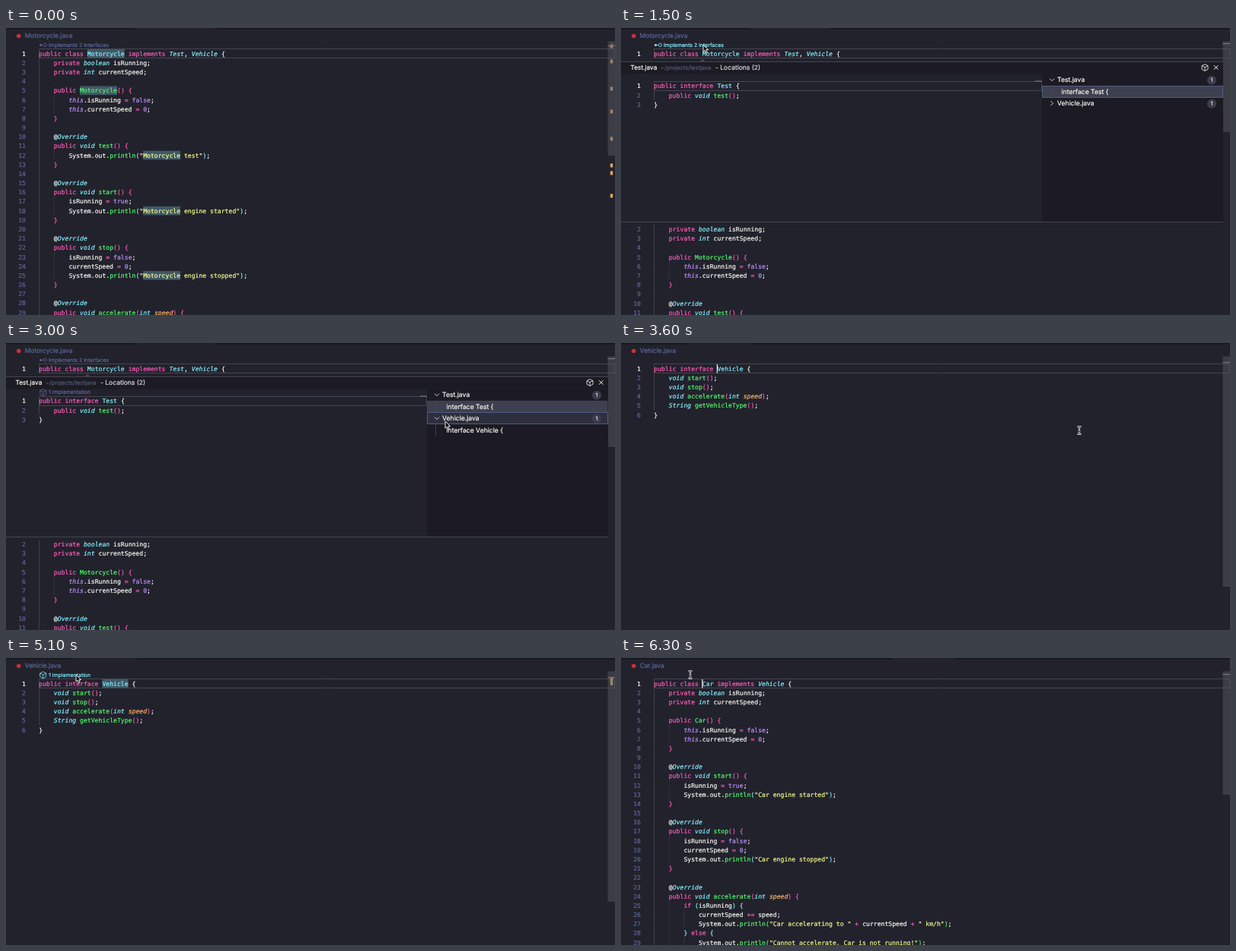
Write an HTML page with a canvas that moves like this. It is 800 by 378 pixels and loops after 6.4 s.

```html
<!DOCTYPE html>
<html lang="en">
<head>
<meta charset="utf-8">
<title>Code navigation</title>
<style>
html, body { margin: 0; height: 100%; overflow: hidden; background: #22222c; }
canvas { display: block; width: 800px; height: 378px; }
</style>
</head>
<body>
<canvas id="stage" width="800" height="378"></canvas>
<script>
const ctx = document.getElementById('stage').getContext('2d');
const LOOP = 6400, LINE = 12.18, CHAR = 4.89, LEFT = 43.3;
const MONO = '"DejaVu Sans Mono", monospace', SANS = 'Inter, sans-serif';
const C = {
  bg: '#22222c', panel: '#1c1b24', border: '#45444f', guide: '#363641', white: '#f8f8f2',
  pink: '#ff5cbc', cyan: '#83efff', green: '#50fa6b', purple: '#bd8ffb',
  yellow: '#f3fb8c', orange: '#ffb469', dim: '#5a6799', mark: '#405966'
};
const BRACKETS = [C.white, C.pink, C.cyan, C.green];

// Source files

const fields = `    private boolean isRunning;
    private int currentSpeed;
`;
const constructorOf = name => `    public ${name}() {
        this.isRunning = false;
        this.currentSpeed = 0;
    }
`;
const method = (signature, ...body) =>
  `    @Override\n    public void ${signature} {\n${body.map(s => '        ' + s).join('\n')}\n    }\n`;
const print = s => `System.out.println("${s}");`;
const startStop = name => [
  method('start()', 'isRunning = true;', print(name + ' engine started')),
  method('stop()', 'isRunning = false;', 'currentSpeed = 0;', print(name + ' engine stopped'))
];
const accelerate = name => method('accelerate(int speed)',
  'if (isRunning) {',
  '    currentSpeed += speed;',
  `    System.out.println("${name} accelerating to " + currentSpeed + " km/h");`,
  '} else {',
  '    ' + print(`Cannot accelerate. ${name} is not running!`),
  '}');

const files = {
  Motorcycle: parse(['public class Motorcycle implements Test, Vehicle {\n' + fields,
    constructorOf('Motorcycle'), method('test()', print('Motorcycle test')),
    ...startStop('Motorcycle'), accelerate('Motorcycle')].join('\n')),
  Car: parse(['public class Car implements Vehicle {\n' + fields,
    constructorOf('Car'), ...startStop('Car'), accelerate('Car')].join('\n')),
  Vehicle: parse(`public interface Vehicle {
    void start();
    void stop();
    void accelerate(int speed);
    String getVehicleType();
}`),
  Test: parse('public interface Test {\n    public void test();\n}')
};

function style(word, before, after) {
  if (word[0] === '"') return [C.yellow];
  if (/^(public|private|class|interface|implements|if|else|[-+=]+)$/.test(word)) return [C.pink];
  if (/^(void|int|boolean|String|Override)$/.test(word)) return [C.cyan, true];
  if (word === 'this') return [C.purple, true];
  if (/^(true|false|\d+)$/.test(word)) return [C.purple];
  if (/(class|interface) $/.test(before)) return [C.cyan];
  if (/implements [\w, ]*$/.test(before) && /\w/.test(word)) return [C.cyan, true];
  if (/\(int $/.test(before)) return [C.orange, true];
  if (/^\w/.test(word) && after[0] === '(') return [C.green];
  return [C.white];
}

function parse(text) {
  let depth = 0;
  return text.split('\n').map(line => ({
    line,
    indent: line ? line.search(/\S/) : 4,
    tokens: [...line.matchAll(/"[^"]*"|\w+|[-+=]+|\S/g)].map(({ 0: word, index }) => {
      let [color, italic] = style(word, line.slice(0, index), line.slice(index + word.length));
      if (/[({]/.test(word[0])) color = BRACKETS[depth++ % 4];
      if (/[)}]/.test(word[0])) color = BRACKETS[--depth % 4];
      return { word, col: index, color, italic };
    })
  }));
}

// Drawing helpers

function rect(x, y, w, h, color) {
  ctx.fillStyle = color;
  ctx.fillRect(x, y, w, h);
}
function frame(x, y, w, h, color) {
  ctx.strokeStyle = color;
  ctx.lineWidth = 1;
  ctx.strokeRect(x, y, w, h);
}
function text(s, x, y, size, color, align = 'left', font = SANS, italic) {
  ctx.font = `${italic ? 'italic ' : ''}${size}px ${font}`;
  ctx.textAlign = align;
  ctx.fillStyle = ctx.strokeStyle = color;
  ctx.fillText(s, x, y);
  // A hairline outline gives the slightly heavier strokes of the editor.
  ctx.lineWidth = 0.2;
  ctx.strokeText(s, x, y);
}
function path(d, x, y, stroke, width = 0.8, fill) {
  const shape = new Path2D(d);
  ctx.save();
  ctx.translate(x, y);
  if (fill) { ctx.fillStyle = fill; ctx.fill(shape); }
  ctx.strokeStyle = stroke;
  ctx.lineWidth = width;
  ctx.stroke(shape);
  ctx.restore();
}
function dot(x, y, r, color) {
  ctx.fillStyle = color;
  ctx.beginPath();
  ctx.arc(x, y, r, 0, 7);
  ctx.fill();
}
const cube = (x, y, color) =>
  path('M0-4.3L4-2.3V2.3L0 4.5L-4 2.3V-2.3ZM-4-2.3L0-.2L4-2.3M0-.2V4.5', x, y, color);

function drawLine({ line, indent, tokens }, number, y, word) {
  text(number, 26, y + 3, 8.12, number === 1 ? C.white : C.dim, 'right', MONO);
  for (let col = 0; col < indent; col += 4)
    rect(LEFT + col * CHAR, y - LINE / 2, 0.8, LINE, col ? C.guide : '#4b4b56');
  if (word)
    for (const { index } of line.matchAll(new RegExp(`\\b${word}\\b`, 'g')))
      rect(LEFT + index * CHAR, y - 5.8, word.length * CHAR, 11.6, C.mark);
  for (const t of tokens)
    text(t.word, LEFT + t.col * CHAR, y + 3, 8.12, t.color, 'left', MONO, t.italic);
}
function drawCode(file, top, right, word, gap = 0) {
  frame(43.5, Math.floor(top - 6) + 0.5, right - 44, 12, C.border);
  file.forEach((line, i) => {
    const y = top + i * LINE + (i ? gap : 0);
    if (y < 385) drawLine(line, i + 1, y, word);
  });
}
function drawLens(label, y, color) {
  if (label[0] === '1') cube(48.7, y, color);
  else {
    dot(45.5, y, 1.5, color);
    path('M1 0H4.2M8.6 0A2.1 2.1 0 1 1 4.4 0A2.1 2.1 0 1 1 8.6 0', 45, y, color);
  }
  text(label, 56, y + 2.4, 6.95, color);
}

// Peek panel

function treeRow(label, row, open) {
  const y = 68.2 + row * 15.5, isFile = open !== undefined;
  if (isFile) {
    path(open ? 'M-3-1.5L0 1.5L3-1.5' : 'M-1.5-3L1.5 0L-1.5 3', 566, y, C.white);
    dot(776, y + 0.5, 6, '#3d3c4e');
    text('1', 776, y + 3.2, 7, C.white, 'center');
  } else rect(564, y - 7.5, 0.8, 15, '#484753');
  text(label, isFile ? 573 : 578.5, y + 3, 8.65, C.white);
}
function drawPeek(t) {
  const expanded = t >= 2700, picked = t >= 3400;
  const name = picked ? 'Vehicle' : 'Test';
  path('M-4 0L0-4.5L4 0Z', 107, 45, C.border, 0.5, C.border);
  rect(0, 45, 791, 211, C.bg);
  rect(0, 45, 791, 15.5, C.panel);
  rect(0, 44, 791, 1, C.border);

  text(name + '.java', 12.5, 55.2, 8.3, C.white);
  const shift = picked ? 12.5 : 0;
  text('~/projects/testjava', 52 + shift, 55.2, 7.5, '#525a76');
  text('- Locations (2)', 124 + shift, 55.2, 8.5, '#d8d8d8');
  cube(767, 52, C.white);
  path('M-2.7-2.7L2.7 2.7M2.7-2.7L-2.7 2.7', 781.7, 52, C.white, 1);

  drawCode(files[name], 76.4, 553);
  if (t >= 2100) drawLens('1 implementation', 65, C.dim);
  rect(544, 69.5, 9, 1.2, '#77777d');

  rect(553, 60.5, 238, 195.5, C.panel);
  const focus = picked ? 107 : expanded ? 91.5 : 76;
  if (expanded) rect(553, 91.5, 237.5, 15.5, '#2e2f3d');
  rect(553, picked ? 107 : 76, 237.5, 15.5, '#3f404f');
  frame(553.5, Math.floor(focus) + 0.5, 237, 15, '#4f5a86');
  treeRow('Test.java', 0, true);
  treeRow('interface Test {', 1);
  treeRow('Vehicle.java', 2, expanded);
  if (expanded) treeRow('interface Vehicle {', 3);
  rect(0, 255, 791, 1, C.border);
}

// Timeline

const pointer = [
  [300, 330, 390], [950, 107, 22], [1300, 107, 22], [1500, 108, 22], [1700, 108, 22],
  [2550, 578, 102], [3000, 577, 103], [3350, 602, 115], [4300, 602, 115],
  [4900, 150, 72], [5100, 92, 22], [5300, 91, 22]
];
function pointerAt(t) {
  if (t < pointer[0][0]) return null;
  const next = pointer.findIndex(k => k[0] > t);
  if (next < 0) return pointer.at(-1).slice(1);
  const [t0, x0, y0] = pointer[next - 1], [t1, x1, y1] = pointer[next];
  const p = (t - t0) / (t1 - t0), e = p * p * (3 - 2 * p);
  return [x0 + (x1 - x0) * e, y0 + (y1 - y0) * e];
}

function viewAt(t) {
  if (t < 3600) {
    const peek = t >= 1300;
    return {
      name: 'Motorcycle', peek, lens: 'Implements 2 interfaces', opened: 200, caret: 13,
      word: !peek && 'Motorcycle', tab: [170, 275], slider: peek ? 137 : 168,
      caretMark: peek ? 20 : 23, marks: peek ? [] : [24, 44, 80, 110, 146, 181, 191, 221]
    };
  }
  if (t < 5850) {
    const ready = t >= 4000;
    return {
      name: 'Vehicle', lens: t >= 4200 && '1 implementation', opened: 3600, caret: 17,
      word: ready && 'Vehicle', tab: [88, 172], slider: 321, caretMark: 25,
      marks: ready ? [31] : [], markHeight: 10
    };
  }
  return { name: 'Car', opened: 5850, caret: 13, tab: [357, 438], slider: 180, caretMark: 21, marks: [] };
}

function drawPointer(x, y, beam) {
  if (beam) {
    const d = 'M-2.5-5Q0-5 0-3.5Q0-5 2.5-5M0-3.5V3.5M-2.5 5Q0 5 0 3.5Q0 5 2.5 5M-1.3 1.5H1.3';
    path(d, x, y, '#fff', 2.2);
    path(d, x, y, '#111', 0.8);
  } else path('M0 0V9.2L2.1 7.3L3.6 10.6L5.2 9.9L3.8 6.7H6.6Z', x, y, '#fff', 0.9, '#111');
}

function draw(t) {
  const view = viewAt(t), mouse = pointerAt(t);
  const hover = view.lens && mouse && mouse[1] < 30 && mouse[0] < 140;
  rect(0, 0, 800, 378, C.bg);
  rect(0, 0, 800, 2, '#191821');
  rect(view.tab[0], 0, view.tab[1] - view.tab[0], 2, C.bg);
  dot(16.7, 10.5, 2.8, '#c7303b');
  text(view.name + '.java', 24.8, 13.4, 8.4, C.dim);

  drawCode(files[view.name], 33.6, 800, view.word, view.peek ? 219.3 : 0);
  if (view.lens) drawLens(view.lens, 22.4, hover ? C.cyan : C.dim);
  const blinkOn = t >= view.opened && (t - view.opened) % 1000 < 500;
  if (!view.peek && blinkOn) rect(LEFT + view.caret * CHAR - 0.6, 28, 1.2, 11.5, C.white);

  for (const y of view.marks) {
    const h = view.markHeight || 5;
    rect(793.8, y - h / 2, 3.4, h, '#dfa463');
  }
  rect(790.5, 17.5, 9.5, view.slider - 17.5, 'rgba(92,92,98,0.45)');
  rect(790.5, view.caretMark, 9.5, 1.2, '#77777d');

  if (view.peek) drawPeek(t);
  if (mouse) {
    const [x, y] = mouse;
    const overPanel = view.peek && (x > 553 || (y > 45 && y < 60));
    drawPointer(x, y, !hover && !overPanel);
  }
}

ctx.textRendering = 'geometricPrecision';
ctx.lineJoin = 'round';
const begin = performance.now();
(function tick() {
  draw((performance.now() - begin) % LOOP);
  requestAnimationFrame(tick);
})();
</script>
</body>
</html>
```
